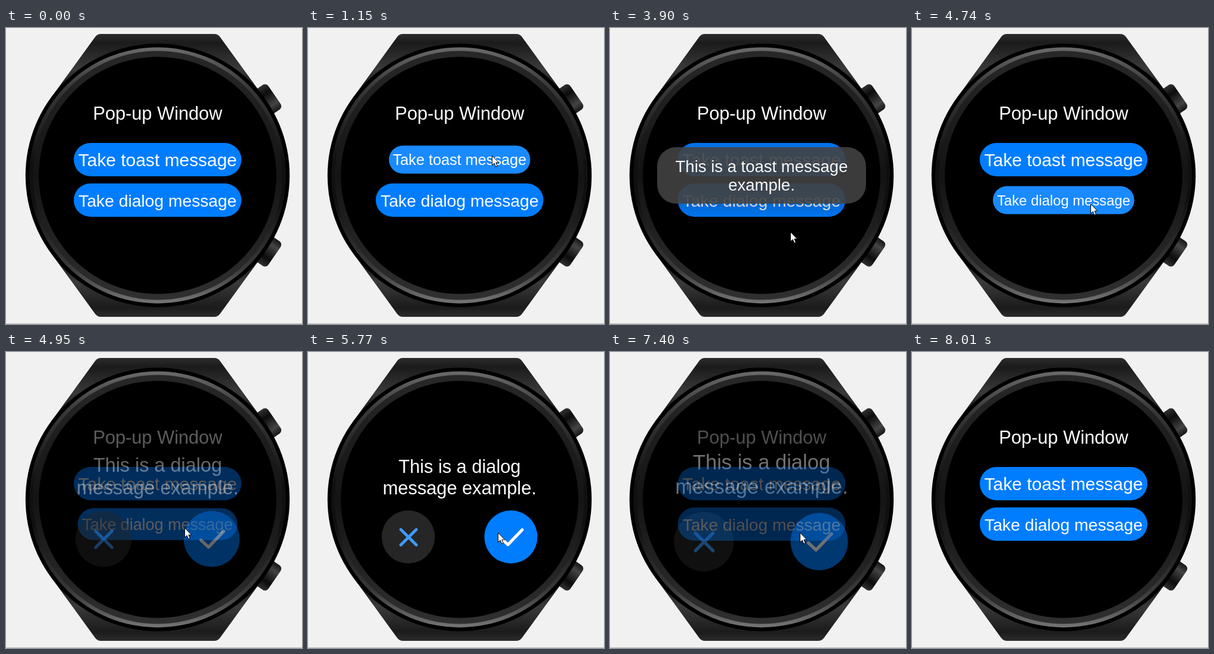
Write an HTML page with a canvas that moves like this. It is 496 by 497 pixels and loops after 8830 ms.

```html
<!DOCTYPE html>
<html lang="en">
<head>
<meta charset="utf-8">
<title>Watch pop-ups</title>
<style>
html, body { margin: 0; width: 100%; height: 100%; overflow: hidden; background: #f1f1f1; }
canvas { display: block; }
</style>
</head>
<body>
<canvas id="stage" width="496" height="497"></canvas>
<script>
const W = 496, H = 497, LOOP = 8830, TICK = 70;
const CX = 254, CY = 247.5;
const BLUE = '#007dff';

const makeLayer = () => Object.assign(document.createElement('canvas'), { width: W, height: H }).getContext('2d');
const ctx = document.getElementById('stage').getContext('2d');
const watch = makeLayer();
const page = makeLayer();
const dialog = makeLayer();

const spans = [[390, 820], [1080, 1500], [2690, 3040], [3900, 4470],
  [4670, 5160], [5560, 5770], [7050, 7880], [7940, 8010]];

// Pointer path: time, x, y
const path = [[390, 431, 475], [820, 308, 214], [2620, 308, 214], [3040, 302, 342],
  [4110, 302, 342], [4470, 299, 295], [5490, 299, 295], [5770, 318, 303],
  [7540, 318, 303], [7880, 389, 445], [7940, 410, 480], [8010, 430, 510]];

const ramp = (t, a, b) => Math.min(1, Math.max(0, (t - a) / (b - a)));
const mix = (a, b, u) => a + (b - a) * u;
const press = (t, down, up) => ramp(t, down - 50, down + 70) * (1 - ramp(t, up, up + 200));

function snap(t) {
  let held = 0;
  for (const [a, b] of spans) {
    if (t >= b) held = b;
    else if (t >= a) return Math.min(b, a + Math.floor((t - a) / TICK) * TICK);
  }
  return held;
}

function shade(g, y0, y1, stops) {
  const grad = g.createLinearGradient(0, y0, 0, y1);
  stops.forEach(([at, color]) => grad.addColorStop(at, color));
  return grad;
}

function disc(g, x, y, r, fill) {
  g.fillStyle = fill;
  g.beginPath();
  g.arc(x, y, r, 0, Math.PI * 2);
  g.fill();
}

function pill(g, x, y, w, h, r, fill) {
  g.fillStyle = fill;
  g.beginPath();
  g.roundRect(x, y, w, h, r);
  g.fill();
}

function label(g, text, size, y, x = 254) {
  g.font = `${size}px "Liberation Sans", Arial, sans-serif`;
  g.textAlign = 'center';
  g.fillStyle = '#fff';
  g.fillText(text, x, y);
}

function lines(g, points, color, width) {
  g.strokeStyle = color;
  g.lineWidth = width;
  g.lineCap = g.lineJoin = 'round';
  g.beginPath();
  points.forEach(([x, y], i) => i ? g.lineTo(x, y) : g.moveTo(x, y));
  g.stroke();
}

function zoom(g, x, y, s, draw) {
  g.save();
  g.translate(x, y);
  g.scale(s, s);
  draw();
  g.restore();
}

// The sides run tangent to the case
function drawStrap(g, edge, root) {
  g.fillStyle = shade(g, edge, root, [[0, '#2c2c2c'], [0.14, '#1b1b1b'],
    [0.55, '#3a3a3a'], [0.85, '#181818'], [1, '#000']]);
  g.beginPath();
  g.moveTo(CX - 178.5, root);
  g.arcTo(CX - 101, edge, CX + 101, edge, 12);
  g.arcTo(CX + 101, edge, CX + 178.5, root, 12);
  g.lineTo(CX + 178.5, root);
  g.fill();
}

function drawCrown(g, side) {
  g.save();
  g.translate(CX, CY);
  g.scale(1, side);
  g.rotate(-0.604);
  pill(g, 200, -25, 38, 50, 7, shade(g, -25, 25,
    [[0, '#303030'], [0.3, '#0c0c0c'], [0.75, '#444'], [1, '#161616']]));
  g.restore();
}

function drawWatch(g) {
  g.fillStyle = '#f1f1f1';
  g.fillRect(0, 0, W, H);
  g.fillStyle = '#b4b4b4';
  g.fillRect(0, 496, W, 1);
  drawCrown(g, 1);
  drawCrown(g, -1);
  drawStrap(g, 10, 117);
  drawStrap(g, 485, 378);
  disc(g, CX, CY, 221.3, '#000');
  disc(g, CX, CY, 215, shade(g, 32, 463, [[0, '#6a6a6a'], [0.15, '#3a3a3a'],
    [0.45, '#101010'], [0.6, '#101010'], [0.86, '#3a3a3a'], [1, '#757575']]));
  disc(g, CX, CY, 209, shade(g, 38, 457, [[0, '#282828'], [0.5, '#141414'], [1, '#303030']]));
  disc(g, CX, CY, 199, '#000');
}

function drawButton(g, y, text, size, baseline, p) {
  zoom(g, 254, y, 1 - 0.157 * p, () => {
    pill(g, -140.5, -28, 281, 56, 28, BLUE);
    if (p) pill(g, -140.5, -28, 281, 56, 28, `rgba(255,255,255,${0.1 * p})`);
    label(g, text, size, baseline, 0);
  });
}

function drawPage(g, t) {
  g.clearRect(0, 0, W, H);
  label(g, 'Pop-up Window', 30.7, 154);
  drawButton(g, 221, 'Take toast message', 29.9, 11, press(t, 1080, 1220));
  drawButton(g, 289, 'Take dialog message', 28.2, 10.5, press(t, 4670, 4810));
}

function drawToast(alpha) {
  ctx.save();
  ctx.globalAlpha = alpha;
  ctx.save();
  ctx.shadowColor = 'rgba(0,0,0,0.3)';
  ctx.shadowBlur = 50;
  ctx.shadowOffsetY = 8;
  pill(ctx, 79, 200, 350, 95, 32, 'rgba(67,67,67,0.93)');
  ctx.restore();
  label(ctx, 'This is a toast message', 27.5, 242);
  label(ctx, 'example.', 27.5, 273);
  ctx.restore();
}

function drawDialog(g, t, size) {
  const p = press(t, 7050, 7250);
  g.clearRect(0, 0, W, H);
  zoom(g, CX, CY, size, () => {
    g.translate(-CX, -CY);
    label(g, 'This is a dialog', 30.7, 203);
    label(g, 'message example.', 30.7, 239);
    disc(g, 168, 310.5, 44.5, '#262626');
    lines(g, [[155.5, 298], [181.5, 324]], '#3f9bff', 4.8);
    lines(g, [[181.5, 298], [155.5, 324]], '#3f9bff', 4.8);
    zoom(g, 340, 310.5, 1 - 0.157 * p, () => {
      disc(g, 0, 0, 44.5, BLUE);
      if (p) disc(g, 0, 0, 44.5, `rgba(255,255,255,${0.1 * p * p})`);
      lines(g, [[-17, 2], [-5, 13], [19, -12]], '#fff', 5);
    });
  });
}

function drawPointer(t) {
  const i = path.findIndex(key => key[0] > t);
  if (i < 1) return;
  const [a, x0, y0] = path[i - 1], [b, x1, y1] = path[i];
  const u = ramp(t, a, b);
  const e = t > 7000 ? u : u * (2 - u);
  ctx.save();
  ctx.translate(Math.round(mix(x0, x1, e)) + 0.5, Math.round(mix(y0, y1, e)) + 0.5);
  ctx.beginPath();
  ctx.moveTo(0, 0);
  [[0, 16], [3.7, 12.6], [6.2, 18.5], [8.8, 17.4], [6.4, 11.6], [11.2, 11.6]]
    .forEach(([x, y]) => ctx.lineTo(x, y));
  ctx.closePath();
  ctx.fillStyle = '#fff';
  ctx.fill();
  ctx.strokeStyle = '#000';
  ctx.lineWidth = 1;
  ctx.stroke();
  ctx.restore();
}

function place(layer, alpha) {
  ctx.globalAlpha = alpha;
  ctx.drawImage(layer.canvas, 0, 0);
  ctx.globalAlpha = 1;
}

function draw(t) {
  const leaving = t > 6000;
  const shown = ramp(t, 4830, 5130) * (1 - ramp(t, 7250, 7520));
  const toast = ramp(t, 1270, 1480) * (1 - ramp(t, 3890, 4120));
  const size = leaving ? 1 + 0.155 * (1 - shown * shown) : 1 + 0.09 * (1 - shown);
  drawPage(page, t);
  drawDialog(dialog, t, size);
  // Whichever view is entering lies on top
  const views = [[page, (1 - shown) ** 2], [dialog, shown]];
  if (leaving) views.reverse();
  place(watch, 1);
  views.forEach(([layer, alpha]) => place(layer, alpha));
  if (toast > 0) drawToast(toast);
  drawPointer(t);
}

drawWatch(watch);
const start = performance.now();
function tick() {
  draw(snap((performance.now() - start) % LOOP));
  requestAnimationFrame(tick);
}
tick();
</script>
</body>
</html>
```
